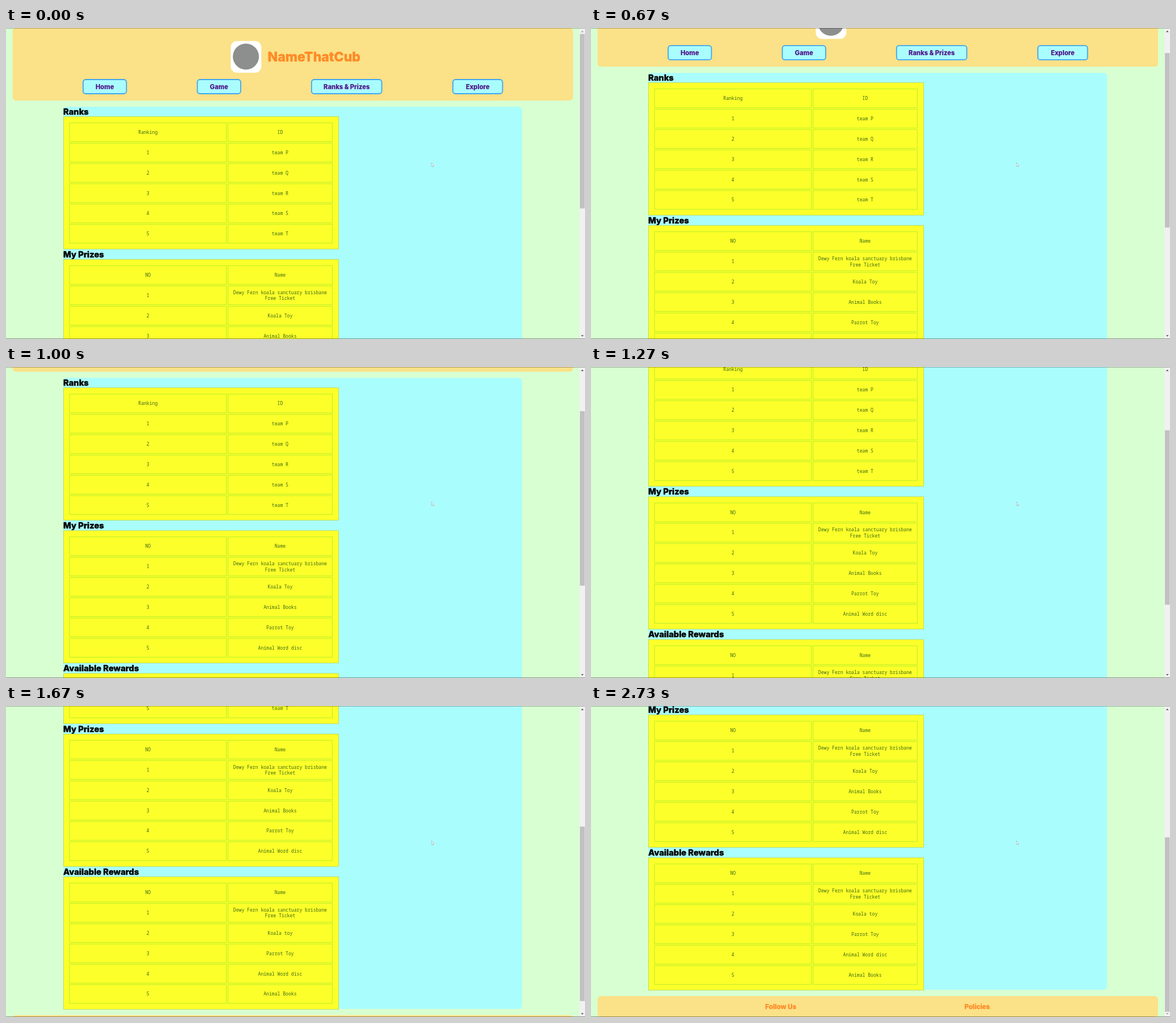
Recreate the animation shown at these times as an HTML page. Size 1021 px wide and 549 px high, loop 3390 ms.

```html
<!DOCTYPE html>
<html lang="en">
<head>
<meta charset="utf-8">
<title>Ranks and Prizes</title>
<style>
  html, body { margin: 0; width: 100%; height: 100%; overflow: hidden; background: #d8ffd2; }
  svg { display: block; }
  text { text-anchor: middle; }
  .bold { font-family: Inter, sans-serif; font-weight: 800; stroke-linejoin: round; stroke-width: .4; }
  .title { font-size: 23px; fill: #ff8a26; stroke: #ff8a26; }
  .heading { font-size: 14.7px; fill: #000; stroke: #000; text-anchor: start; }
  .link { font-size: 11.2px; fill: #4f1589; stroke: #4f1589; stroke-width: .1; }
  .foot { font-size: 11.6px; fill: #ff8a26; stroke: #ff8a26; stroke-width: .2; }
  .cell { font: 8.1px "Noto Sans Mono", monospace; fill: #3f6a14; }
  .panel { fill: #fbe187; }
  .main { fill: #aafdfd; }
  .button { fill: #aafdfd; stroke: #3fa6f0; stroke-width: 1.8; }
  .table { fill: #fcff2a; stroke: #b4d45c; stroke-width: .8; }
  .box { fill: none; stroke: #b9ee2c; stroke-width: 1; }
</style>
</head>
<body>
<svg width="1021" height="549" viewBox="0 0 1021 549">
  <rect width="1021" height="549" fill="#d8ffd2"/>
  <g id="page"></g>
  <rect x="1011" width="10" height="549" fill="#f1f1f1"/>
  <rect id="thumb" x="1012" width="8.5" height="308" fill="#c1c1c1"/>
  <path id="up" d="M1014 7.2h4.6l-2.3-2.6z"/>
  <path id="down" d="M1014 542.2h4.6l-2.3 2.6z"/>
  <path d="M750.3 238v6.6l1.5-1.3 1 2 .9-.4-1-2h1.9z" fill="#fff" stroke="#888" stroke-width=".5"/>
  <rect width="1021" height="1" fill="#000" opacity=".3"/>
  <rect y="548" width="1021" height="1" fill="#000" opacity=".4"/>
</svg>
<script>
const page = document.getElementById("page");
const thumb = document.getElementById("thumb");
const up = document.getElementById("up");
const down = document.getElementById("down");

function add(tag, attributes, content = "") {
  const node = document.createElementNS("http://www.w3.org/2000/svg", tag);
  for (const key in attributes) node.setAttribute(key, attributes[key]);
  node.textContent = content;
  page.append(node);
}
const rect = (name, x, y, width, height, rx = 0) =>
  add("rect", { class: name, x, y, width, height, rx });
const text = (name, x, y, content) => add("text", { class: name, x, y }, content);

function cell(x, width, y, content) {
  rect("box", x, y, width, 33.2);
  const lines = content.split("\n");
  lines.forEach((line, i) =>
    text("cell", x + width / 2, y + 19.6 + (i - (lines.length - 1) / 2) * 10.8, line));
}

function table(index, heading, columns, names) {
  const top = 156.4 + index * 252.1;
  text("bold heading", 101, top - 3.8, heading);
  rect("table", 101.5, top, 485.1, 233.8);
  [columns[1], ...names].forEach((name, row) => {
    const y = top + 11 + row * 35.86;
    cell(112, 276.6, y, row ? String(row) : columns[0]);
    cell(391.4, 184, y, name);
  });
}

// Header
rect("panel", 11.5, 0, 988.5, 128, 6);
add("rect", { x: 396.3, y: 23, width: 54, height: 56, rx: 11, fill: "#fff" });
add("circle", { cx: 423, cy: 50.5, r: 23, fill: "#8d8f8e" });
text("bold title", 543.3, 59.3, "NameThatCub");
for (const [label, x, width] of [["Home", 136, 76.4], ["Game", 337.4, 76.4],
    ["Ranks & Prizes", 538.8, 123.8], ["Explore", 788, 87.6]]) {
  rect("button", x, 91, width, 25, 4.5);
  text("bold link", x + width / 2, 107.6, label);
}

// Content
rect("main", 101, 139, 809, 754.7, 6);
const ticket = "Dewy Fern koala sanctuary brisbane\nFree Ticket";
table(0, "Ranks", ["Ranking", "ID"], [..."PQRST"].map(letter => "team " + letter));
table(1, "My Prizes", ["NO", "Name"],
  [ticket, "Koala Toy", "Animal Books", "Parrot Toy", "Animal Word disc"]);
table(2, "Available Rewards", ["NO", "Name"],
  [ticket, "Koala toy", "Parrot Toy", "Animal Word disc", "Animal Books"]);

// Footer
rect("panel", 11.5, 904.7, 988.5, 37, 6);
text("bold foot", 334.7, 927.6, "Follow Us");
text("bold foot", 681, 927.6, "Policies");

// Wheel notches: [time in ms, scroll position in notches]
const notch = 59.84, end = 392.7, loop = 3390;
const scrolls = [[0, 0], [670, 1], [1000, 2], [1270, 3], [1470, 5], [1670, 6], [1730, 7]];

const start = performance.now();
function draw(now) {
  const time = Math.max(0, now - start) % loop;
  const [, notches] = scrolls.findLast(([from]) => time >= from);
  const offset = Math.min(notches * notch, end);
  page.setAttribute("transform", `translate(0 ${-offset})`);
  thumb.setAttribute("y", 10.5 + offset * .5635);
  up.setAttribute("fill", offset > 0 ? "#505050" : "#a3a3a3");
  down.setAttribute("fill", offset < end ? "#505050" : "#a3a3a3");
  requestAnimationFrame(draw);
}
draw(start);
</script>
</body>
</html>
```
